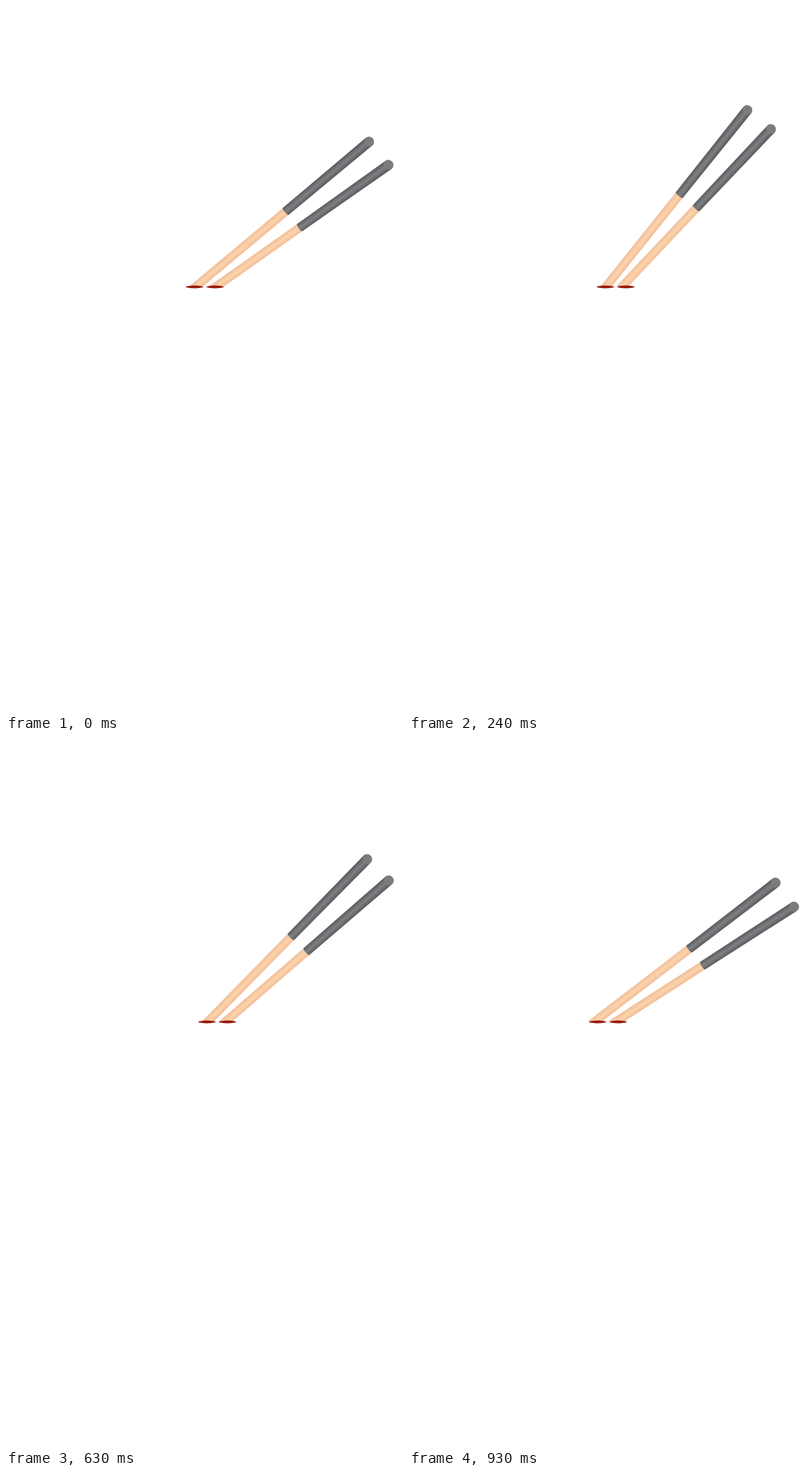
Write an HTML page that moves like this. It is 561 by 998 pixels and loops after 0.96 s.

```html
<!DOCTYPE html>
<html lang="en">
<head>
<meta charset="utf-8">
<title>Sticks</title>
<style>
  html, body { margin: 0; width: 100%; height: 100%; overflow: hidden; background: #fff; }
  svg { display: block; width: 561px; height: 998px; }
</style>
</head>
<body>
<svg viewBox="0 0 561 998">
  <defs>
    <linearGradient id="grip" x2="0" y2="1">
      <stop offset="0" stop-color="#58595b"/>
      <stop offset=".5" stop-color="#7f8083"/>
      <stop offset="1" stop-color="#58595b"/>
    </linearGradient>
    <linearGradient id="wood" x2="0" y2="1">
      <stop offset="0" stop-color="#f1bd98"/>
      <stop offset=".5" stop-color="#fcd4ac"/>
      <stop offset="1" stop-color="#f1bd98"/>
    </linearGradient>
    <clipPath id="above"><rect width="561" height="395.6"/></clipPath>
    <!-- cap at the origin, axis along +x -->
    <g id="stick">
      <path d="M150-6.2H360V6.2H150Z" fill="url(#wood)"/>
      <path d="M0-7.1L154-6.4Q156.5 0 154 6.4L0 7.1A7 7.1 0 0 1 0-7.1Z" fill="url(#grip)"/>
      <ellipse rx="6.6" ry="6.8" fill="#7b7c7e"/>
    </g>
    <ellipse id="tip" cy="396.5" rx="12.3" ry="1.9" fill="#971a0c"/>
  </defs>
  <g clip-path="url(#above)">
    <g id="pair">
      <use href="#stick"/>
      <use href="#stick" transform="translate(0 -42.8) rotate(4.7)"/>
    </g>
  </g>
  <g id="tips">
    <use href="#tip"/>
    <use href="#tip" x="29"/>
  </g>
</svg>
<script>
  const LOOP = 960, STEP = 30;
  const pair = document.getElementById('pair');
  const tips = document.getElementById('tips');

  // The swing starts and ends at the strike, where it reverses sharply.
  const times = [-30, 0, 90, 240, 360, 510, 750, 930];
  const capX  = [518, 513, 495, 478, 484, 500, 517, 518];
  const capY  = [200, 191.5, 169, 147, 144, 155, 180, 200];
  const angle = [37.5, 39.9, 45, 51.3, 52, 48.9, 42, 37.5];
  const tipX  = [266.5, 266.5, 270.5, 277.5, 284.5, 287, 278, 266.5];

  // Smooth curve through the key poses
  function curve(v) {
    const last = times.length - 1;
    const gap = i => times[i + 1] - times[i];
    const slope = i => (v[i + 1] - v[i]) / gap(i);
    const tangent = i => {
      if (i === 0) return slope(0);
      if (i === last) return slope(last - 1);
      const a = gap(i - 1), b = gap(i);
      return (slope(i - 1) * b + slope(i) * a) / (a + b);
    };
    return t => {
      let i = 0;
      while (i < last - 1 && t >= times[i + 1]) i++;
      const h = gap(i), u = (t - times[i]) / h, w = 1 - u;
      return v[i] * w * w * (1 + 2 * u) + v[i + 1] * u * u * (3 - 2 * u)
        + h * u * w * (tangent(i) * w - tangent(i + 1) * u);
    };
  }

  const x = curve(capX), y = curve(capY), tilt = curve(angle), tip = curve(tipX);

  function draw() {
    const t = Math.floor(performance.now() % LOOP / STEP) * STEP;
    pair.setAttribute('transform', `translate(${x(t)} ${y(t)}) rotate(${180 - tilt(t)})`);
    tips.setAttribute('transform', `translate(${tip(t)} 0)`);
    requestAnimationFrame(draw);
  }
  draw();
</script>
</body>
</html>
```
